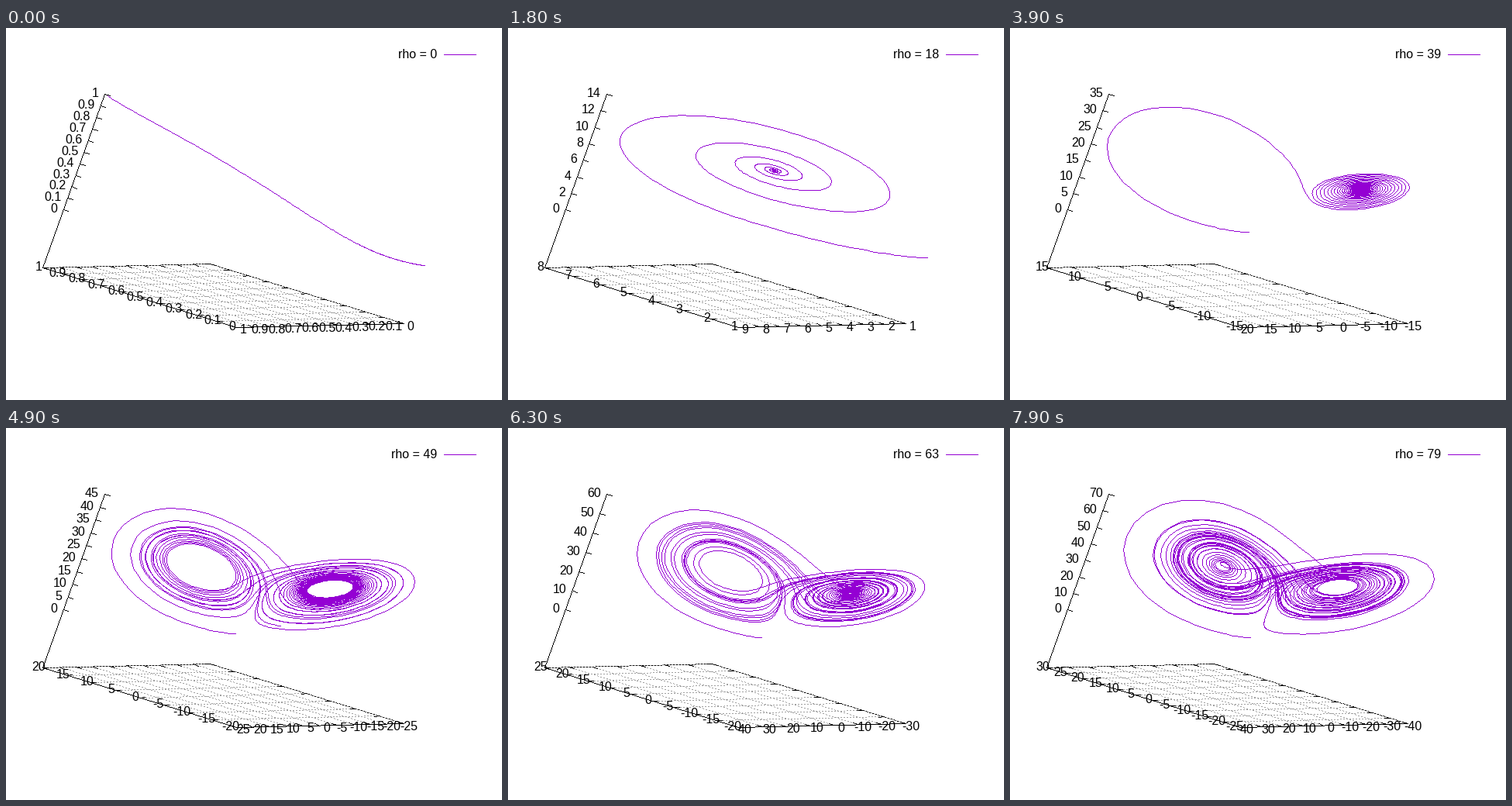
These frames come from a looping animation (640x480 px, 8 s). A matplotlib script:

```python
import matplotlib.pyplot as plt
import numpy as np
from matplotlib.animation import FuncAnimation

W, H, DPI = 640, 480, 100
FRAMES, INTERVAL = 80, 100
SIGMA, BETA, DT, STEPS = 10, 8 / 3, 0.01, 4000
BLACK, GRAY, PURPLE = (0, 0, 0), (160, 160, 160), (148, 0, 211)

# Skewed projection: base corner of the two minima and the axis vectors
CORNER = np.array([513.0, 381.0])
XV = np.array([-250.0, -77.0])
YV = np.array([-216.0, 5.0])
ZV = np.array([80.0, -224.0]) / 1.5
FLOOR = ZV / 2
ZFOOT = CORNER + XV + YV
XTICK = 7 * XV / np.hypot(*XV)
YTICK = 7 * YV / np.hypot(*YV)

plt.rcParams["font.family"] = "Liberation Sans"
plt.rcParams["font.size"] = 16 * 72 / DPI


def flow(s, rho):
    x, y, z = s
    return np.array([SIGMA * (y - x), x * (rho - z) - y, x * y - BETA * z])


def integrate(rho):
    """Runge-Kutta paths for all rho values at once: (step, xyz, rho)."""
    s = np.ones((3, len(rho)))
    path = np.empty((STEPS, 3, len(rho)))
    for i in range(STEPS):
        k1 = flow(s, rho)
        k2 = flow(s + DT / 2 * k1, rho)
        k3 = flow(s + DT / 2 * k2, rho)
        k4 = flow(s + DT * k3, rho)
        s = s + DT / 6 * (k1 + 2 * k2 + 2 * k3 + k4)
        path[i] = s
    return path


def tick_step(span):
    power = 10 ** np.floor(np.log10(span))
    room = 20 * power / span
    for limit, step in ((40, 0.05), (20, 0.1), (10, 0.2), (4, 0.5), (2, 1)):
        if room > limit:
            return step * power
    return 2 * power


def ticks(values):
    """Tick values from an autoscaled range, and their places in 0..1."""
    lo, hi = values.min(), values.max()
    step = tick_step(hi - lo)
    k = np.arange(np.floor(lo / step), np.ceil(hi / step) + 1)
    return k * step, (k - k[0]) / (k[-1] - k[0])


paths = integrate(np.arange(FRAMES) / 2)

fig = plt.figure(figsize=(W / DPI, H / DPI), dpi=DPI, facecolor="white")
ax = fig.add_axes([0, 0, 1, 1])
ax.axis("off")
canvas = np.full((H, W, 3), 255, np.uint8)
picture = ax.imshow(canvas, extent=(-0.5, W - 0.5, H - 0.5, -0.5),
                    aspect="auto", interpolation="nearest")
labels = []


def stroke(points, color, dotted=False):
    """Crisp one-pixel polyline without smoothing."""
    p = np.rint(points)
    d = np.diff(p, axis=0)
    count = np.abs(d).max(axis=1).astype(int)
    seg = np.repeat(np.arange(len(d)), count)
    k = np.arange(len(seg)) - np.repeat(np.cumsum(count) - count, count)
    xy = p[seg] + d[seg] * (k / count[seg])[:, None]
    xy = np.floor(np.vstack([xy, p[-1:]]) + 0.5).astype(int)
    if dotted:
        xy = xy[np.arange(len(xy)) % 4 < 2]
    canvas[xy[:, 1], xy[:, 0]] = color


def label(x, y, text, ha):
    labels.append(ax.text(x, y + 5.5, text, ha=ha, va="baseline"))


def tick_label(p, v, dx, dy):
    # non-negative numbers keep a blank in place of the sign
    blank = 0 if v < 0 else 2.2
    label(p[0] + dx + blank, p[1] + dy, f"{v:g}", "center")


def draw(i):
    while labels:
        labels.pop().remove()
    canvas.fill(255)
    data = paths[:, :, i]
    (xv, xu), (yv, yu), (zv, zu) = (ticks(data[:, a]) for a in range(3))

    # the grid lies over the back edges and under the front ones
    stroke([ZFOOT, CORNER + XV, CORNER], BLACK)
    for u in xu:
        stroke([CORNER + u * XV + YV, CORNER + u * XV], GRAY, True)
    for u in yu:
        stroke([CORNER + u * YV, CORNER + u * YV + XV], GRAY, True)
    stroke([ZFOOT, CORNER + YV, CORNER], BLACK)
    stroke([ZFOOT, ZFOOT + FLOOR + ZV], BLACK)

    for v, u in zip(xv, xu):
        far = CORNER + u * XV
        near = far + YV
        stroke([near, near - YTICK], BLACK)
        stroke([far, far + YTICK], BLACK)
        tick_label(near, v, -7.7, -2)
    for v, u in zip(yv, yu):
        near = CORNER + u * YV
        far = near + XV
        stroke([near, near + XTICK], BLACK)
        stroke([far, far - XTICK], BLACK)
        tick_label(near, v, 6.3, 2.5)
    for v, u in zip(zv, zu):
        p = ZFOOT + FLOOR + u * ZV
        stroke([p, p - XTICK], BLACK)
        label(p[0] - 7.7, p[1] - 2, f"{v:g}", "right")

    lo = np.array([xv[0], yv[0], zv[0]])
    hi = np.array([xv[-1], yv[-1], zv[-1]])
    unit = (data - lo) / (hi - lo)
    stroke(CORNER + FLOOR + unit @ np.array([XV, YV, ZV]), PURPLE)
    stroke([(565, 34), (606, 34)], PURPLE)
    label(556, 33, f"rho = {i}", "right")

    picture.set_data(canvas)
    return [picture, *labels]


anim = FuncAnimation(fig, draw, frames=FRAMES, interval=INTERVAL,
                     init_func=lambda: draw(0), repeat=True, repeat_delay=0,
                     blit=False)
plt.show()
```
